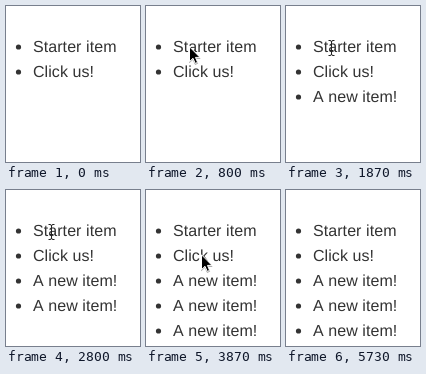
Recreate the animation shown at these times as an HTML page. Size 134 px wide and 156 px high, loop 6390 ms.

```html
<!DOCTYPE html>
<html lang="en">
<head>
<meta charset="utf-8">
<title>Growing list</title>
<style>
  html, body { margin: 0; width: 100%; height: 100%; overflow: hidden; background: #fff; }
  svg { display: block; width: 134px; height: 156px; }
  text { font: 16px "Liberation Sans", Arial, sans-serif; letter-spacing: .07px; font-kerning: none; text-rendering: geometricPrecision; }
  #list { fill: #333; }
  #arrow { stroke: #fff; stroke-linejoin: round; filter: drop-shadow(0 1px .6px #0005); }
  #beam { fill: none; stroke: #222; }
</style>
</head>
<body>
<svg viewBox="0 0 134 156">
  <g id="list"></g>
  <path id="arrow" d="M1.5 .8V15.6L5 12.3 7.2 17.4 9.6 16.4 7.5 11.4H12Z"/>
  <path id="beam" d="M.5 .5H2Q3.5 .5 3.5 2V14Q3.5 15.5 2 15.5H.5M6.5 .5H5Q3.5 .5 3.5 2M6.5 15.5H5Q3.5 15.5 3.5 14M2 10.5H5"/>
</svg>
<script>
const LOOP = 6390;
const $ = id => document.getElementById(id);

// [label, time it appears]
const items = [
  ["Starter item", 0], ["Click us!", 0],
  ["A new item!", 1870], ["A new item!", 2800], ["A new item!", 3670],
];

// Pointer samples, each held until the next: [time, shape, x, y]
const pointer = [
  [0, ""],
  [200, "arrow", 124, 137], [270, "arrow", 112, 133], [330, "arrow", 96, 126],
  [400, "arrow", 77, 115], [470, "arrow", 40, 80], [530, "arrow", 13, 50],
  [670, "arrow", 18, 48], [730, "arrow", 32, 43], [800, "arrow", 42, 40],
  [1130, "arrow", 43, 40],
  [1730, "beam", 42, 34], [3070, "beam", 48, 47], [3130, "beam", 53, 58],
  [3870, "arrow", 54, 64],
  [5470, "arrow", 58, 65], [5530, "arrow", 73, 68], [5600, "arrow", 95, 73],
  [5670, "arrow", 117, 78],
  [5730, ""],
];

$("list").innerHTML = items.map(([label], i) => {
  const base = 46 + 25 * i;
  return `<g><circle cx="12.5" cy="${base - 5}" r="2.6"/><text x="27" y="${base}">${label}</text></g>`;
}).join("");
const rows = [...$("list").children];

const show = (el, on) => el.style.display = on ? "" : "none";

function draw(now) {
  const t = now % LOOP;
  rows.forEach((row, i) => show(row, t >= items[i][1]));
  const [, shape, x, y] = pointer.findLast(p => t >= p[0]);
  for (const id of ["arrow", "beam"]) show($(id), id === shape);
  if (shape) $(shape).setAttribute("transform", `translate(${x} ${y})`);
}

const start = performance.now();
function tick() {
  draw(performance.now() - start);
  requestAnimationFrame(tick);
}
tick();
</script>
</body>
</html>
```
